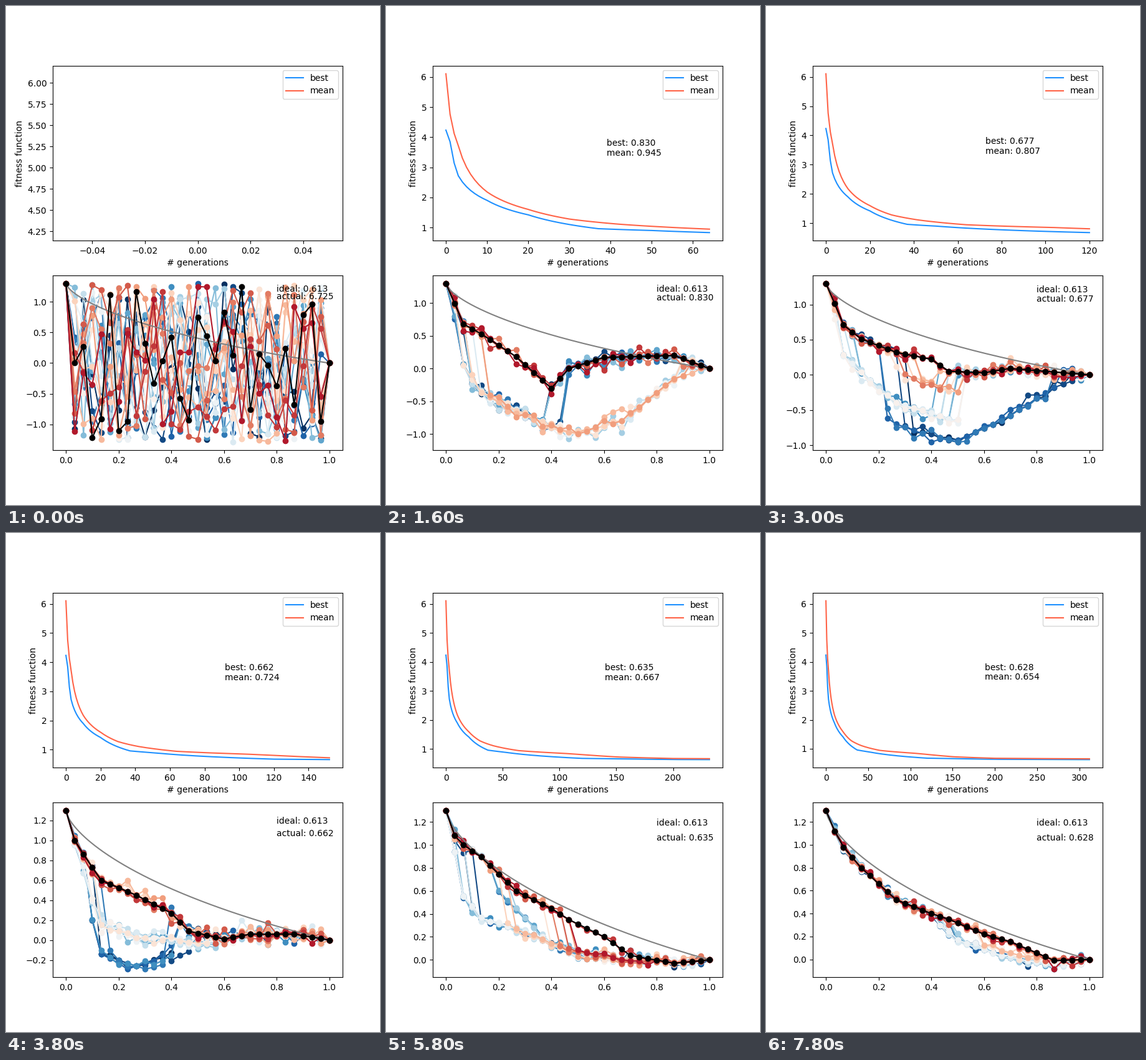
A matplotlib script for the animation above (8000 ms loop, 600 by 800 pixels).

```python
import numpy as np
import matplotlib.pyplot as plt
from matplotlib.animation import FuncAnimation

NODES, POP, FRAMES, STEP = 31, 20, 40, 8
TOP, IDEAL = 1.3, 0.613
index = np.arange(NODES)
x = index / (NODES - 1)


def path(nodes, heights):
    return np.interp(index, [0, *nodes, NODES - 1], [TOP, *heights, 0])


def pin(paths):
    paths[..., 0], paths[..., -1] = TOP, 0
    return paths


def wild_stage():
    """Uniformly random paths before any selection."""
    rng = np.random.default_rng(11)
    best, *pop = pin(rng.uniform(-1.29, TOP, (POP + 1, NODES)))
    return 0, -1.29, 0, best, np.array(pop) - best


def stage(frame, floor, spread, best, low, groups):
    """Best path plus, by rank, paths that cross over to a lower valley.

    Each group is (size, depth, first node, last node)."""
    rng = np.random.default_rng(frame)
    best = path([1, 2, 4, 8, 12, 14, 18, 21, 26], best)
    drop = path([2, 4, 8, 12, 15, 20, 26], low) - best
    offset = np.zeros((POP, NODES))
    rank = 0
    for size, depth, start, end in groups:
        for row in offset[rank:rank + size]:
            a, b = start + rng.integers(0, 4), end + rng.integers(-2, 2)
            row[a:b + 1] = depth * drop[a:b + 1]
        rank += size
    return frame, floor, spread, best, offset


stages = [
    wild_stage(),
    stage(8, -1.124, .07,
          [.99, .68, .53, .18, -.3, 0, .17, .18, .2],
          [.05, -.37, -.65, -.9, -1, -.8, -.15],
          [(7, 1, 1, 12), (9, 1, 2, 28)]),
    stage(15, -.958, .05,
          [1.01, .71, .51, .32, .22, .05, .03, .09, .04],
          [.1, -.17, -.7, -.88, -.93, -.65, -.18],
          [(4, 1, 7, 27), (8, .7, 1, 14), (5, .3, 8, 14)]),
    stage(19, -.291, .045,
          [1, .86, .6, .45, .27, .09, .01, .06, .06],
          [.55, -.14, -.26, -.15, -.1, -.05, -.02],
          [(5, 1, 2, 13), (8, .6, 1, 17)]),
    stage(25, -.1, .025,
          [1.06, .985, .89, .61, .45, .35, .19, .04, -.03],
          [.54, .35, .28, .14, .07, 0, -.03],
          [(11, 1, 1, 22), (4, 1, 7, 22), (5, 1, 12, 24)]),
    stage(33, -.063, .022,
          [1.1, 1.015, .9, .585, .445, .35, .21, .035, -.03],
          [.95, .78, .42, .12, .03, 0, -.03],
          [(10, 1, 5, 22), (7, 1, 12, 22)]),
    stage(39, -.085, .022,
          [1.12, .98, .8, .52, .4, .35, .22, .155, -.01],
          [.98, .85, .55, .36, .17, .03, -.06],
          [(11, 1, 12, 28), (4, .7, 17, 26)]),
]


def history(gens, key_gens, fits):
    """Power-law pieces between a few known generations."""
    return np.exp(np.interp(np.log1p(gens), np.log1p(key_gens), np.log(fits)))


gens = np.arange(FRAMES * STEP)
best_fit = history(
    gens, [0, 1, 3, 10, 20, 37, 50, 64, 120, 152, 200, 264, 312],
    [4.235, 3.85, 2.72, 1.9, 1.42, .96, .9, .83, .677, .662, .638, .633, .628])
mean_fit = history(
    gens, [0, 3, 10, 20, 30, 42, 64, 104, 120, 152, 200, 264, 312],
    [6.107, 3.72, 2.18, 1.6, 1.28, 1.11, .945, .85, .807, .724, .673, .661,
     .654])

fig, (top, bottom) = plt.subplots(2, figsize=(6, 8), dpi=100)
best_line, = top.plot([], [], color="dodgerblue", label="best")
mean_line, = top.plot([], [], color="tomato", label="mean")
top.set_xlabel("# generations")
top.set_ylabel("fitness function")
top.legend(loc="upper right")
best_text = top.text(0, 3.72, "")
mean_text = top.text(0, 3.38, "")

colors = plt.cm.RdBu_r(np.linspace(0, 0.9, POP))
pop_lines = [bottom.plot(x, x, "-o", color=c)[0] for c in colors]

# Cycloid through the start and end points
theta = np.linspace(0, 2.0, 200)
run, fall = theta - np.sin(theta), 1 - np.cos(theta)
bottom.plot(run / run[-1], TOP * (1 - fall / fall[-1]), color="gray")

path_line, = bottom.plot(x, x, "-o", color="black")
bottom.set_xlim(-0.05, 1.05)
bottom.text(0.8, 0.9 * TOP, f"ideal: {IDEAL}")
actual_text = bottom.text(0.8, 0.8 * TOP, "")


def population(k):
    """Lower bound, best path and all paths at frame k."""
    n = max(i for i in range(len(stages) - 1) if stages[i][0] <= k)
    k0, floor0, spread0, best0, offset0 = stages[n]
    k1, floor1, spread1, best1, offset1 = stages[n + 1]
    u = (k - k0) / (k1 - k0)
    if n == 0:
        u = w = u ** 0.6
    else:
        # each path is replaced at its own moment
        w = np.random.default_rng(n).random((POP, 1)) < u
    floor = floor0 + u * (floor1 - floor0)
    spread = spread0 + u * (spread1 - spread0)
    best = best0 + u * (best1 - best0)
    rng = np.random.default_rng(100 + k)
    mutated = rng.random((POP, NODES)) < 0.5
    noise = mutated * rng.normal(0, 1, (POP, NODES)) * spread
    pop = best + (1 - w) * offset0 + w * offset1 + noise
    return floor, best, pin(np.clip(pop, floor, TOP))


def update(k):
    g = k * STEP
    best_line.set_data(gens[:g + 1], best_fit[:g + 1])
    mean_line.set_data(gens[:g + 1], mean_fit[:g + 1])
    pad = 0.05 * g if g else 0.055
    top.set_xlim(-pad, g + pad)
    low, high = best_fit[g], mean_fit[0]
    pad = 0.05 * (high - low)
    top.set_ylim(low - pad, high + pad)
    for label, name, value in ((best_text, "best", low),
                               (mean_text, "mean", mean_fit[g])):
        label.set_x(0.6 * (g + 1))
        label.set_text(f"{name}: {value:.3f}")
        label.set_visible(g > 0)

    floor, best, pop = population(k)
    for line, y in zip(pop_lines, pop):
        line.set_ydata(y)
    path_line.set_ydata(best)
    actual_text.set_text(f"actual: {low if k else 6.725:.3f}")
    pad = 0.05 * (TOP - floor)
    bottom.set_ylim(floor - pad, TOP + pad)
    return []


anim = FuncAnimation(fig, update, frames=FRAMES, interval=200, repeat=True,
                     repeat_delay=0, init_func=lambda: update(0), blit=False)
plt.show()
```
